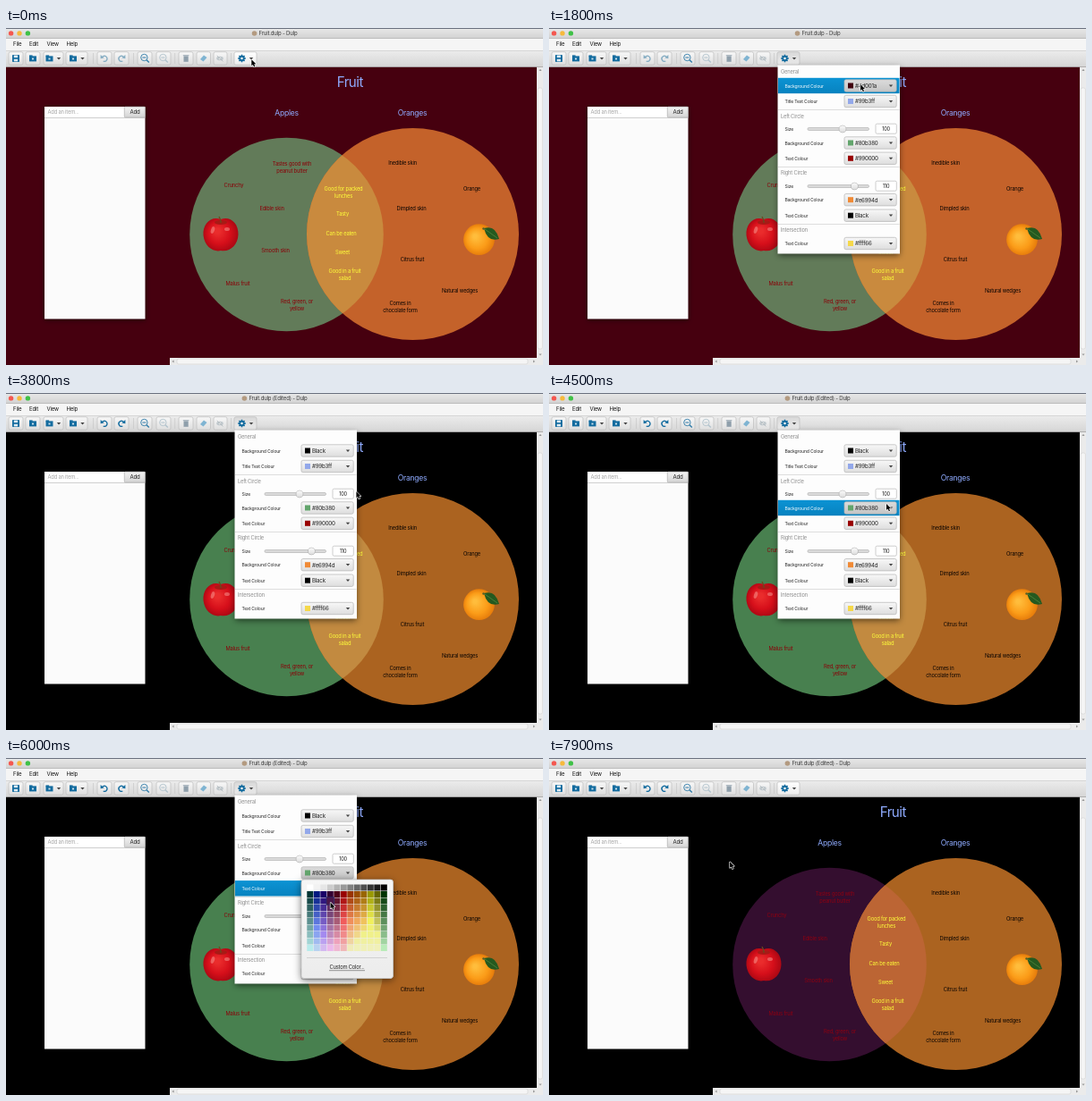
These frames come from a looping animation (600 by 377 pixels, 8 s). An HTML page with a canvas:

```html
<!DOCTYPE html>
<html lang="en">
<head>
<meta charset="utf-8">
<title>Fruit diagram</title>
<style>
html, body { margin: 0; width: 100%; height: 100%; overflow: hidden; background: #000; }
canvas { display: block; width: 600px; height: 377px; }
</style>
</head>
<body>
<canvas id="stage"></canvas>
<script>
const W = 600, H = 377, LOOP = 8000;
const canvas = document.getElementById('stage');
const ratio = window.devicePixelRatio || 1;
canvas.width = W * ratio;
canvas.height = H * ratio;
const c = canvas.getContext('2d');

const OPEN = 700, PICK1 = 2100, BLACK = 3000, PICK2 = 4700, PICKED = 6300, PURPLE = 7000, CLOSE = 7700;
const BLUE = '#146c9f';

const PATH = [
  [0, 274.3, 35.3], [700, 274.3, 35.3], [1500, 348, 63], [2100, 348, 63],
  [2800, 425, 78.5], [3100, 425, 78.5], [4200, 377, 124], [4700, 377, 124],
  [5700, 362.5, 161.5], [7000, 362.5, 161.5], [7600, 202, 116], [LOOP, 202, 116]
];

const THEMES = [
  { bg: '#46000f', left: '#627b59', right: '#c4622a', both: '#c98a3e' },
  { bg: '#000000', left: '#48804f', right: '#ab6320', both: '#c28a40' },
  { bg: '#000000', left: '#340e2f', right: '#ab6320', both: '#bc6534' }
];

const LEFT_ITEMS = [
  ['Tastes good with', 319.5, 152], ['peanut butter', 319.5, 160], ['Crunchy', 254.5, 176],
  ['Edible skin', 297, 201.5], ['Smooth skin', 301, 249], ['Malus fruit', 259, 285.5],
  ['Red, green, or', 325, 306], ['yellow', 325, 314]
];
const BOTH_ITEMS = [
  ['Good for packed', 377, 180], ['lunches', 377, 188], ['Tasty', 376, 208],
  ['Can be eaten', 374.5, 229.5], ['Sweet', 376, 250.5], ['Good in a fruit', 378.5, 271.5], ['salad', 378.5, 279.5]
];
const RIGHT_ITEMS = [
  ['Inedible skin', 443, 151], ['Orange', 520.5, 180], ['Dimpled skin', 453, 202],
  ['Citrus fruit', 454, 259], ['Natural wedges', 507, 293.5], ['Comes in', 440.5, 307.5], ['chocolate form', 440.5, 315.5]
];

// First shade of each palette column; later rows get lighter.
const HUES = [[0, 51, 51], [0, 26, 128], [26, 0, 104], [51, 0, 51], [77, 0, 26], [153, 0, 0],
  [153, 51, 0], [153, 77, 0], [153, 102, 0], [153, 153, 0], [102, 102, 0], [0, 51, 0]];
const GREYS = [255, 242, 230, 204, 179, 153, 128, 102, 77, 51, 26, 0];

function rect(x, y, w, h, fill) {
  c.fillStyle = fill;
  c.fillRect(x, y, w, h);
}

function vertical(y, h, top, bottom) {
  const g = c.createLinearGradient(0, y, 0, y + h);
  g.addColorStop(0, top);
  g.addColorStop(1, bottom);
  return g;
}

function box(x, y, w, h, r, fill, stroke) {
  c.beginPath();
  c.roundRect(x, y, w, h, r);
  c.fillStyle = fill;
  c.fill();
  if (stroke) {
    c.strokeStyle = stroke;
    c.lineWidth = 0.7;
    c.stroke();
  }
}

function ellipse(x, y, rx, ry, fill, turn = 0) {
  c.beginPath();
  c.ellipse(x, y, rx, ry, turn, 0, Math.PI * 2);
  c.fillStyle = fill;
  c.fill();
}

const disc = (x, y, r, fill) => ellipse(x, y, r, r, fill);

function poly(points, fill) {
  c.beginPath();
  points.forEach(([x, y]) => c.lineTo(x, y));
  c.closePath();
  c.fillStyle = fill;
  c.fill();
}

function line(points, color, width) {
  c.beginPath();
  points.forEach(([x, y]) => c.lineTo(x, y));
  c.strokeStyle = color;
  c.lineWidth = width;
  c.stroke();
}

// y is the middle of the capitals
function text(s, x, y, size, color, align = 'left') {
  c.font = size + 'px Inter, "Liberation Sans", sans-serif';
  c.letterSpacing = -size * 0.035 + 'px';
  c.textAlign = align;
  c.fillStyle = color;
  c.fillText(s, x, y + size * 0.36);
}

function shadow(blur, dy, draw) {
  c.save();
  c.shadowColor = 'rgba(0,0,0,.55)';
  c.shadowBlur = blur * ratio;
  c.shadowOffsetY = dy * ratio;
  draw();
  c.restore();
}

const arrow = (x, y, color = '#444') => poly([[x - 2.2, y - 1.1], [x + 2.2, y - 1.1], [x, y + 1.4]], color);

function cursorAt(t) {
  let i = 1;
  while (i < PATH.length - 1 && t > PATH[i][0]) i++;
  const [t0, x0, y0] = PATH[i - 1], [t1, x1, y1] = PATH[i];
  const p = Math.min(1, (t - t0) / (t1 - t0)), e = p * p * (3 - 2 * p);
  return [x0 + (x1 - x0) * e, y0 + (y1 - y0) * e];
}

function pointer(x, y) {
  const pts = [[0, 0], [0, 7], [1.6, 5.6], [2.8, 8.2], [4, 7.7], [2.9, 5.2], [5, 5]].map(p => [x + p[0], y + p[1]]);
  c.lineJoin = 'round';
  line([...pts, pts[0]], '#fff', 1.2);
  poly(pts, '#000');
}

function titleBar(edited) {
  rect(0, 0, W, 12, vertical(0, 12, '#e9e9e9', '#d1d1d1'));
  rect(0, 0, W, 0.8, '#4a5364');
  rect(0, 11.3, W, 0.7, '#b4b4b4');
  ['#f4574f', '#f6b93b', '#3fc146'].forEach((color, i) => disc(5.6 + i * 9.4, 5.9, 2.7, color));
  const label = edited ? 'Fruit.dulp (Edited) - Dulp' : 'Fruit.dulp - Dulp';
  text(label, 304, 6.2, 6.1, '#3c3c3c', 'center');
  disc(304 - c.measureText(label).width / 2 - 5, 6, 2.8, '#b39a80');
  rect(0, 12, W, 13, '#f5f5f5');
  [['File', 8], ['Edit', 26], ['View', 45.5], ['Help', 67.5]].forEach(([s, x]) => text(s, x, 18, 6.1, '#111'));
}

function button(x, w, fill) {
  box(x, 26.8, w, 14.4, 2, fill || vertical(27, 14, '#f8f8f8', '#dedede'), '#bdbdbd');
}

function turnArrow(x, dir, color) {
  c.beginPath();
  if (dir > 0) c.arc(x, 34.3, 3, -2.6, 2);
  else c.arc(x, 34.3, 3, -0.54, 1.14, true);
  c.strokeStyle = color;
  c.lineWidth = 1.4;
  c.stroke();
  poly([[x - dir * 4.4, 30], [x - dir * 4.4, 34.2], [x - dir * 0.4, 33.4]], color);
}

function lens(x, color) {
  c.beginPath();
  c.arc(x - 0.6, 33, 3.7, 0, Math.PI * 2);
  c.strokeStyle = color;
  c.lineWidth = 0.9;
  c.stroke();
  line([[x + 2, 35.7], [x + 4.8, 38.5]], color, 1.4);
  line([[x - 2.6, 33], [x + 1.4, 33]], color, 1);
}

function folder(x) {
  rect(x - 4, 30.4, 3.6, 2, BLUE);
  rect(x - 4, 31.4, 8, 6, BLUE);
  rect(x - 1, 33.6, 2, 1.8, '#cfe3ee');
}

function toolBar(edited, open) {
  rect(0, 25, W, 18.5, vertical(25, 18, '#ececec', '#d6d6d6'));
  rect(0, 25, W, 0.6, '#c6c6c6');
  rect(0, 43, W, 0.6, '#a5a5a5');
  [[3, 16], [22, 16], [42, 22], [67, 24], [102, 16], [121, 16], [147, 16], [168, 16],
    [193, 16], [213, 15.5], [232, 15]].forEach(([x, w]) => button(x, w));
  button(255, 25, open ? vertical(27, 14, '#d9d9d9', '#ededed') : vertical(27, 14, '#ffffff', '#ececec'));
  [97, 142, 188.5, 251].forEach(x => rect(x, 28, 0.6, 12, '#c4c4c4'));

  box(7, 30, 8, 8, 0.8, BLUE);
  rect(8.8, 30.5, 4.3, 2.6, '#dceaf2');
  rect(8.8, 34.8, 4.3, 2.6, '#dceaf2');
  [30, 48.5, 75].forEach(folder);
  arrow(59, 34);
  arrow(85.5, 34);

  const history = edited ? BLUE : '#86adc3';
  turnArrow(110, 1, history);
  turnArrow(129, -1, history);
  lens(155, '#2e7ba8');
  lens(176, '#b0c2cc');

  rect(198.5, 31.4, 5.2, 6.4, '#8f9fab');
  rect(197.8, 30.3, 6.6, 0.9, '#8f9fab');
  poly([[217, 35], [221, 30.5], [224.5, 33], [220.5, 37.6]], '#7fb4d2');
  ellipse(239, 34, 3.8, 2.3, '#c0c8cd');
  disc(239, 34, 1.2, '#e8e8e8');
  line([[235.8, 31], [242.5, 37.3]], '#b1babf', 0.9);

  for (let i = 0; i < 4; i++) {
    const a = i * Math.PI / 4, dx = Math.cos(a) * 4.3, dy = Math.sin(a) * 4.3;
    line([[263.5 - dx, 34 - dy], [263.5 + dx, 34 + dy]], BLUE, 1.6);
  }
  disc(263.5, 34, 3.2, BLUE);
  disc(263.5, 34, 1.3, '#f2f2f2');
  arrow(274, 34);
}

function apple() {
  const g = c.createRadialGradient(236, 227, 3, 240, 231, 22);
  g.addColorStop(0, '#ea2c2c');
  g.addColorStop(0.5, '#d60f1a');
  g.addColorStop(1, '#a00612');
  c.beginPath();
  c.moveTo(240, 214);
  c.bezierCurveTo(229, 210, 219.5, 219, 220.5, 232);
  c.bezierCurveTo(222, 245, 232, 251, 240, 249);
  c.bezierCurveTo(250, 251, 259, 243, 259.5, 231);
  c.bezierCurveTo(260, 218, 250, 210, 240, 214);
  c.fillStyle = g;
  c.fill();
  ellipse(240, 217.5, 7, 2.4, '#a81a16');
  line([[240.3, 218], [239.6, 214.5], [238, 211]], '#6b4a20', 1.3);
  ellipse(231, 226, 2, 4, 'rgba(255,190,180,.4)', 0.3);
  ellipse(247, 225, 3, 2, 'rgba(255,190,180,.4)');
}

function orange() {
  const g = c.createRadialGradient(524, 233, 2, 528, 237, 18);
  g.addColorStop(0, '#ffbd3c');
  g.addColorStop(0.6, '#fb9c18');
  g.addColorStop(1, '#e57a0a');
  disc(528.5, 236.7, 17.4, g);
  c.beginPath();
  c.moveTo(534, 224);
  c.quadraticCurveTo(547, 220, 551, 236);
  c.quadraticCurveTo(538, 240, 534, 224);
  c.fillStyle = '#25591f';
  c.fill();
  line([[535, 225], [542, 230], [549, 235]], '#5a8d42', 0.7);
  disc(533.5, 224.5, 1.2, '#55602a');
}

function diagram(theme, purple) {
  rect(0, 43.5, W, H - 43.5, theme.bg);
  disc(313.5, 231, 108.3, theme.left);
  disc(454.5, 230.5, 118.5, theme.right);
  c.save();
  c.beginPath();
  c.arc(313.5, 231, 108.3, 0, Math.PI * 2);
  c.clip();
  disc(454.5, 230.5, 118.5, theme.both);
  c.restore();
  const title = '#8fabff';
  text('Fruit', 384.3, 60.6, 15.2, title, 'center');
  text('Apples', 313.5, 94.5, 8.6, title, 'center');
  text('Oranges', 454, 94.5, 8.6, title, 'center');
  const write = (items, color) => items.forEach(([s, x, y]) => text(s, x, y, 5.8, color, 'center'));
  write(LEFT_ITEMS, purple ? '#8c0012' : '#8a0008');
  write(BOTH_ITEMS, '#ffff3a');
  write(RIGHT_ITEMS, '#0b0502');
  apple();
  orange();
}

function sidePanel() {
  shadow(5, 1, () => rect(43, 88, 112.5, 237.5, '#fbfbfb'));
  rect(43, 88, 89, 12, '#ffffff');
  rect(43, 100, 112.5, 0.6, '#b5b5b5');
  text('Add an item...', 46.5, 93.8, 5.8, '#a5a5a5');
  box(132.3, 88.2, 23, 11.8, 1, vertical(88, 12, '#f3f3f3', '#d4d4d4'), '#b0b0b0');
  text('Add', 144, 93.8, 6.1, '#222', 'center');
}

function scrollBars() {
  rect(183, 369, 417, 8, '#ebebeb');
  rect(593, 43.5, 7, 333.5, '#ebebeb');
  box(191, 370, 392, 6, 2, '#f5f5f5', '#d6d6d6');
  box(594, 67, 5.4, 292, 2, '#f5f5f5', '#d6d6d6');
  const tone = '#999';
  poly([[187.6, 371.4], [187.6, 374.6], [185.4, 373]], tone);
  poly([[589, 371.4], [589, 374.6], [591.2, 373]], tone);
  poly([[595.4, 48], [598.6, 48], [597, 45.8]], tone);
  poly([[595.4, 364.4], [598.6, 364.4], [597, 366.6]], tone);
}

function combo(y, color, label, dark, focus) {
  box(330, y - 6.7, 58.2, 13.4, 1.8,
    dark ? vertical(y - 7, 14, '#dcdcdc', '#c4c4c4') : vertical(y - 7, 14, '#f8f8f8', '#dddddd'), '#b3b3b3');
  if (focus) {
    c.beginPath();
    c.roundRect(329.8, y - 6.9, 58.6, 13.8, 2);
    c.strokeStyle = '#3d9cca';
    c.lineWidth = 1;
    c.stroke();
  }
  rect(334, y - 3, 6, 6, color);
  text(label, 342, y + 0.2, 6.2, '#222');
  arrow(382, y);
}

function slider(y, knob, value) {
  text('Size', 263.5, y + 0.4, 5.1, '#222');
  box(289, y - 1.5, 68.5, 3, 1.4, '#dadada', '#b5b5b5');
  disc(knob, y, 4.3, '#a9a9a9');
  disc(knob, y, 3.7, vertical(y - 4, 8, '#fbfbfb', '#dcdcdc'));
  box(365, y - 5.8, 23.3, 11, 1.5, '#fff', '#b8b8b8');
  text(value, 376.5, y - 0.2, 5.6, '#222', 'center');
}

function hoverRow(t) {
  if (t >= 1200 && t < PICK1) return 64.5;
  if (t >= 3900 && t < 4900) return 128.5;
  if (t >= 4900 && t < 7400) return 145.8;
  return 0;
}

function menu(t) {
  shadow(7, 2, () => rect(255.5, 41.5, 136.5, 211, '#fdfdfd'));
  const hot = hoverRow(t);
  if (hot) rect(256, hot - 8.7, 135.5, 17.4, vertical(hot - 9, 18, '#0c93d4', '#0782bf'));
  [91, 155, 219].forEach(y => rect(256, y, 135.5, 0.6, '#c9c9c9'));
  [['General', 49.4], ['Left Circle', 98.8], ['Right Circle', 162.3], ['Intersection', 226.4]]
    .forEach(([s, y]) => text(s, 259, y, 5.8, '#8d8d8d'));
  slider(113, 328, '100');
  slider(177, 341.3, '110');

  const bg = t >= BLACK ? ['#000', 'Black'] : ['#40000e', '#4d001a'];
  const left = t >= PURPLE ? ['#4d1a4d', '#4d1a4d'] : ['#62a56c', '#80b380'];
  [
    [64.5, 'Background', ...bg, t >= 1300 && t < PICK1, t >= PICK1 && t < BLACK],
    [82, 'Title Text', '#93a8ea', '#99b3ff'],
    [128.5, 'Background', ...left, t >= 4000],
    [145.8, 'Text', '#990000', '#990000'],
    [192.2, 'Background', '#f08a35', '#e6994d'],
    [209.7, 'Text', '#000', 'Black'],
    [241, 'Text', '#f5d84a', '#ffff66']
  ].forEach(([y, name, color, label, dark, focus]) => {
    text(name + ' Colour', 263.5, y + 0.2, 5.1, y === hot ? '#fff' : '#222');
    combo(y, color, label, dark, focus);
  });
}

function shade(col, row) {
  const rgb = row ? HUES[col].map(v => Math.min(240, Math.round(v + (row - 1) * 23))) : Array(3).fill(GREYS[col]);
  return `rgb(${rgb})`;
}

function picker(top, mx, my) {
  const size = 7.5, x0 = 336.3, y0 = top + 5.5;
  shadow(8, 2, () => box(330, top, 102.5, 110.5, 3, '#f3f3f3'));
  box(330, top, 102.5, 110.5, 3, vertical(top, 110, '#f6f6f6', '#ececec'), '#bdbdbd');
  for (let row = 0; row < 10; row++) {
    for (let col = 0; col < 12; col++) {
      rect(x0 + col * size, y0 + row * size, size - 0.5, size - 0.5, shade(col, row));
    }
  }
  const col = Math.floor((mx - x0) / size), row = Math.floor((my - y0) / size);
  if (col >= 0 && col < 12 && row >= 0 && row < 10) {
    box(x0 + col * size - 0.8, y0 + row * size - 0.8, size + 1.1, size + 1.1, 0, shade(col, row), '#26306e');
  }
  rect(336, top + 87, 90, 0.6, '#bfbfbf');
  text('Custom Color...', 381, top + 98.3, 5.8, '#222', 'center');
  rect(361, top + 101.6, 40, 0.5, '#333');
}

function draw(t) {
  const edited = t >= BLACK, purple = t >= PURPLE, open = t >= OPEN && t < CLOSE;
  const [x, y] = cursorAt(t);
  c.setTransform(ratio, 0, 0, ratio, 0, 0);
  diagram(THEMES[purple ? 2 : edited ? 1 : 0], purple);
  scrollBars();
  sidePanel();
  titleBar(edited);
  toolBar(edited, open);
  if (open) menu(t);
  if (t >= PICK1 && t < BLACK) picker(72, x, y);
  if (t >= PICK2 && t < PICKED) picker(136, x, y);
  pointer(x, y);
}

const start = performance.now();
function tick() {
  const t = (performance.now() - start) % LOOP;
  draw(Math.floor(t / 100) * 100);
  requestAnimationFrame(tick);
}
tick();
</script>
</body>
</html>
```
